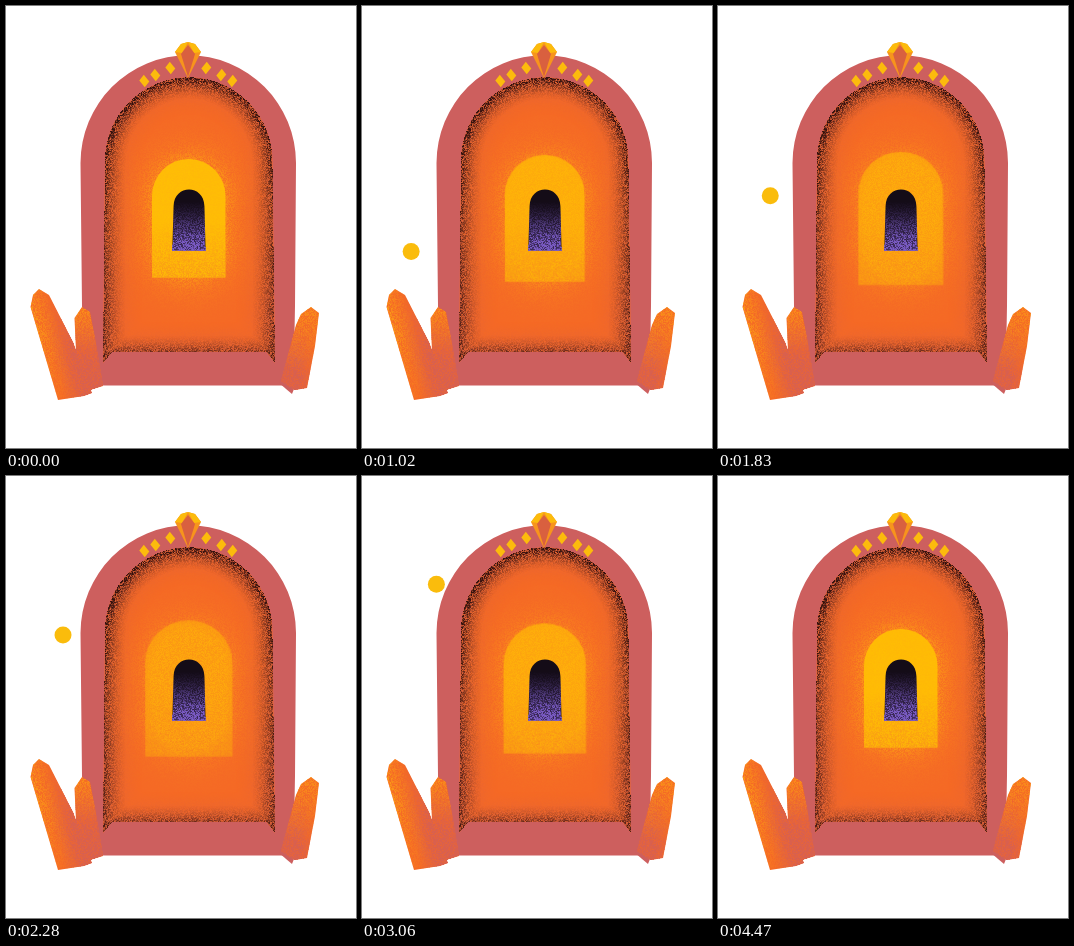
An HTML page with a canvas that plays this animation: 350x442 px, repeating every 4.5 s.

```html
<!DOCTYPE html>
<html>
<head>
<meta charset="utf-8">
<style>
  html, body { margin: 0; width: 100%; height: 100%; overflow: hidden; background: #fff; }
  canvas { display: block; }
</style>
</head>
<body>
<canvas id="stage" width="350" height="442"></canvas>
<script>
const W = 350, H = 442, LOOP = 4500;
const PINK = '#cd5f5e', ORANGE = '#f56926', YELLOW = '#fcbb0c';
const stage = document.getElementById('stage').getContext('2d');

let seed = 7;
const random = () => (seed = (seed * 16807) % 2147483647) / 2147483647;
const clamp = v => Math.max(0, Math.min(1, v));
const polygon = points => new Path2D('M' + points + 'Z');

function layer() {
  const canvas = document.createElement('canvas');
  canvas.width = W;
  canvas.height = H;
  return canvas.getContext('2d');
}

function fill(ctx, path, color) {
  ctx.fillStyle = color;
  ctx.fill(path);
}

// Tints each pixel inside a path by amount(x, y); roughness scatters the tint.
function grain(ctx, path, color, roughness, amount) {
  ctx.save();
  ctx.fillStyle = color;
  for (let y = 0; y < H; y++) {
    for (let x = 0; x < W; x++) {
      const base = amount(x, y);
      if (base < .01 || !ctx.isPointInPath(path, x + .5, y + .5)) continue;
      ctx.globalAlpha = clamp(base * (1 + roughness * (2 * random() - 1)));
      ctx.fillRect(x, y, 1, 1);
    }
  }
  ctx.restore();
}

function drawPortal(ctx) {
  fill(ctx, new Path2D('M74.5 157A1 1 0 0 1 290 157L289 300 287.5 379.5H76.5L76 300Z'), PINK);
  const opening = new Path2D('M99 155A1 1 0 0 1 266.4 155L269 357 260.5 346H106L97 357Z');
  fill(ctx, opening, ORANGE);

  const edge = (x, y) => Math.max(0, y < 155
    ? 84 - Math.hypot(x - 182.5, y - 155)
    : Math.min(x - 98, 267 - x, (347 - y) * 1.2));
  const falloff = (x, y, reach) => clamp(1 - edge(x, y) / reach) ** 2;
  const strength = y => 1 - .4 * clamp((y - 120) / 100);
  grain(ctx, opening, '#d9603f', .4, (x, y) => .8 * falloff(x, y, 42));
  grain(ctx, opening, '#35120f', 1, (x, y) => .75 * strength(y) * falloff(x, y, 24));

  const halo = (x, y) => {
    const nearestY = Math.max(190, Math.min(236, y));
    return Math.max(0, Math.hypot(x - 182.5, y - nearestY) - 36);
  };
  grain(ctx, opening, '#fd9a16', .7, (x, y) => .6 * Math.exp(-halo(x, y) / 14));
}

function drawJewels(ctx) {
  fill(ctx, polygon('175 38 182 36 189 38 195 46 182 72 169 46'), '#f7941d');
  fill(ctx, polygon('169 46 175 38 182 36 176 47'), YELLOW);
  fill(ctx, polygon('195 46 189 38 182 36 188 47'), YELLOW);
  fill(ctx, polygon('182 39 189 48 182 71 175 48'), '#d9603f');
  for (const [x, y] of [[44, 75], [33, 69], [18, 62]]) {
    for (const side of [-1, 1]) {
      const at = (dx, dy) => `${182.3 + side * (x + dx)} ${y + dy} `;
      fill(ctx, polygon(at(.5, -6.3) + at(5, -.5) + at(-.5, 6.3) + at(-5, .5)), YELLOW);
    }
  }
}

function drawCrystal(ctx, points, light, shade) {
  const path = polygon(points);
  fill(ctx, path, ORANGE);
  grain(ctx, path, '#d8604f', .5, shade);
  grain(ctx, path, '#fca315', 1, light);
}

function drawCrystals(ctx) {
  drawCrystal(ctx, '68.5 312 76 301 84 306 89 332 97 380 84 384 70 345',
    (x, y) => .35 * clamp((345 - y) / 40),
    (x, y) => clamp((y - 305) / 65));
  drawCrystal(ctx, '24.5 301 27 289 33 283 43 289 67 336 86 387 78 390 52 394',
    (x, y) => .45 * clamp(1 - (x - 25 - (y - 301) * .3) / 22) * clamp((410 - y) / 90),
    (x, y) => .9 * clamp((x - 28 - (y - 290) * .28) / 24) * clamp((y - 280) / 70));
  fill(ctx, polygon('273 377 277 368 290 378 286 388'), PINK);
  drawCrystal(ctx, '290 319 295 308 305 301 313 307 309 340 301 382 289 384 275 375',
    (x, y) => .35 * clamp((365 - y) / 60),
    (x, y) => .9 * clamp((y - 310) / 60) * clamp((312 - x) / 22));
}

const scene = layer();
drawPortal(scene);
drawJewels(scene);
drawCrystals(scene);

const glow = layer();
const glowArch = new Path2D('M146 190A36.7 37 0 0 1 219.4 190V271.5H146Z');
fill(glow, glowArch, '#ffbf06');
grain(glow, glowArch, '#fa9a18', .8, (x, y) => .08 + .5 * clamp((y - 215) / 56));

const door = layer();
const doorway = new Path2D('M167.6 200C168 178 198 178 198.4 200L199.6 244.5H166.3Z');
fill(door, doorway, '#140c17');
grain(door, doorway, '#7a5bc4', .6, (x, y) => .95 * clamp((y - 194) / 50) ** 1.3);

const sunPath = document.createElementNS('http://www.w3.org/2000/svg', 'path');
sunPath.setAttribute('d', 'M46 316Q48 294 49 273C49 255 49 237 50 219C51 199 53 178 57 159' +
  'C61 141 65 123 74.5 108C83 95 95 83 110 77C124 71 140 65 159 62');
const sunTravel = sunPath.getTotalLength();

function draw(now) {
  const t = (now % LOOP) / LOOP;
  const pulse = 1 - Math.abs(1 - 2 * t);
  stage.fillStyle = '#fff';
  stage.fillRect(0, 0, W, H);

  const sun = sunPath.getPointAtLength(t * sunTravel);
  stage.fillStyle = '#fabc0c';
  stage.beginPath();
  stage.arc(sun.x, sun.y, 8.5, 0, 2 * Math.PI);
  stage.fill();

  stage.drawImage(scene.canvas, 0, 0);

  stage.save();
  stage.globalAlpha = 1 - .5 * pulse;
  stage.translate(182.6, 212);
  stage.scale(1 + .19 * pulse, 1 + .15 * pulse);
  stage.drawImage(glow.canvas, -182.6, -212);
  stage.restore();

  stage.drawImage(door.canvas, 0, 0);
}

const start = performance.now();
function tick() {
  draw(performance.now() - start);
  requestAnimationFrame(tick);
}
tick();
</script>
</body>
</html>
```
